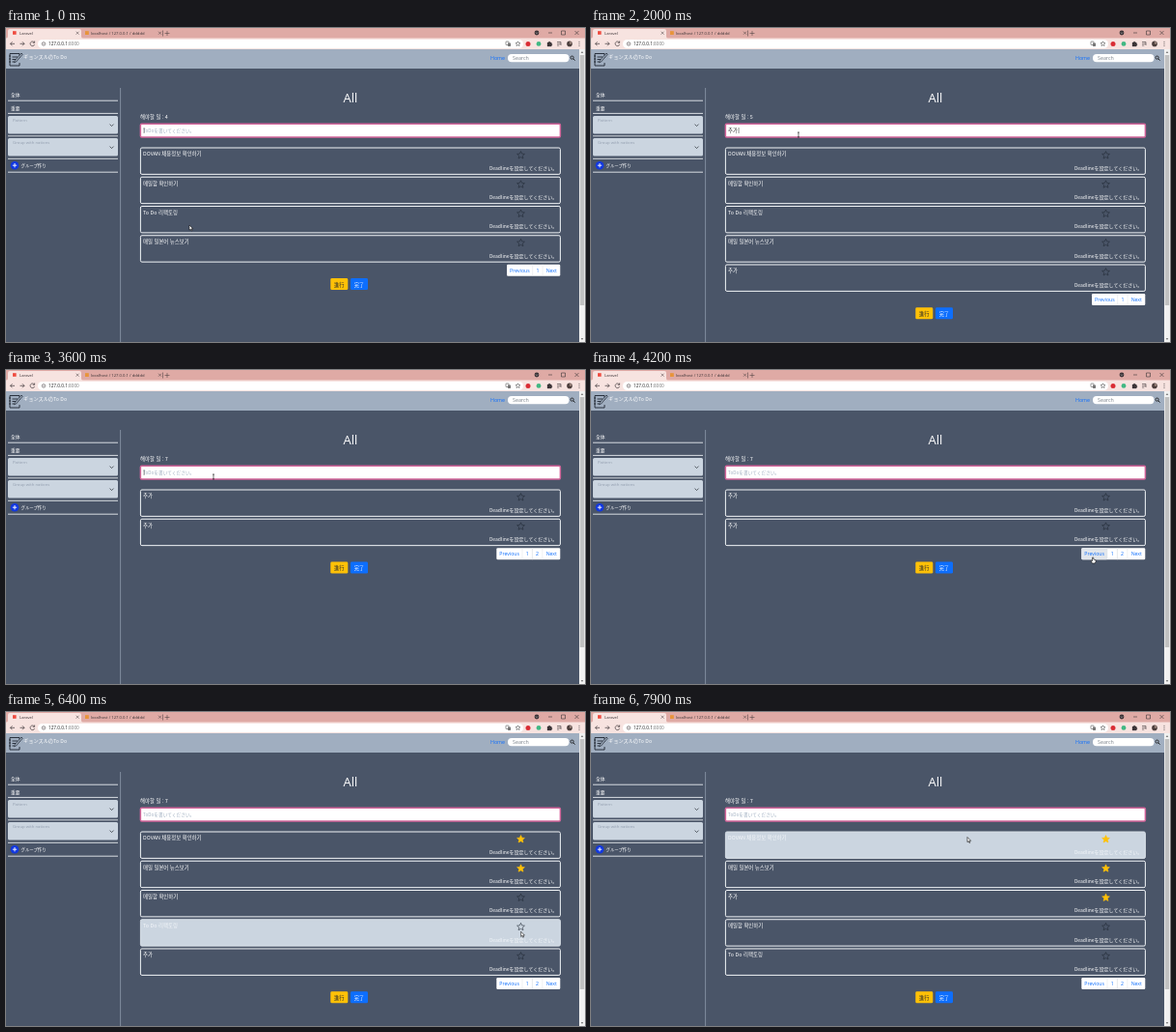
Recreate the animation shown at these times as an HTML page. Size 600 px wide and 325 px high, loop 8000 ms.

```html
<!DOCTYPE html>
<html lang="ko">
<head>
<meta charset="utf-8">
<style>
html, body { margin: 0; width: 100%; height: 100%; overflow: hidden; background: #4a5568; }
svg { display: block; width: 600px; height: 325px; }
text { font-family: "Noto Sans CJK KR", "Noto Sans CJK JP", "Noto Sans CJK", sans-serif; dominant-baseline: central; white-space: pre; }
.jp { font-family: "Noto Sans CJK JP", "Noto Sans CJK", sans-serif; }
.ui { font-family: "Open Sans", "Noto Sans", sans-serif; }
</style>
</head>
<body>
<svg viewBox="0 0 600 325"><g id="page"></g><g id="live"></g></svg>
<script>
const LOOP = 8000, ROW = 30.25, TOP = 124;
const BLUE = '#0d6efd', YELLOW = '#ffc107', PALE = '#cbd5e0', BODY = '#4a5568', INK = '#3c3437';

const rect = (x, y, w, h, fill, r = 0, more = '') =>
  `<rect x="${x}" y="${y}" width="${w}" height="${h}" rx="${r}" fill="${fill}" ${more}/>`;
const dot = (x, y, r, fill, more = '') => `<circle cx="${x}" cy="${y}" r="${r}" fill="${fill}" ${more}/>`;
const line = (d, color = INK, w = 0.7, fill = 'none') =>
  `<path d="${d}" fill="${fill}" stroke="${color}" stroke-width="${w}"/>`;
const text = (x, y, s, size, fill, cls = '', anchor = 'start') =>
  `<text x="${x}" y="${y}" font-size="${size}" fill="${fill}" class="${cls}" text-anchor="${anchor}">${s}</text>`;

function star(x, y, r, stroke, fill) {
  let d = '';
  for (let i = 0; i < 10; i++) {
    const a = i * Math.PI / 5, q = i % 2 ? r * 0.47 : r;
    d += (i ? 'L' : 'M') + (x + q * Math.sin(a)).toFixed(2) + ' ' + (y - q * Math.cos(a)).toFixed(2);
  }
  return line(d + 'Z', stroke, 0.6, fill);
}

function browser() {
  return rect(0, 0, 600, 11, '#dfaaa5') +
    line('M0 11Q2 11 2 8V3Q2 1 4 1H76Q78 1 78 3V8Q78 11 80 11Z', 'none', 0, '#f7e3e0') +
    rect(0, 10.5, 600, 11.5, '#f7e3e0') +
    rect(7, 3.2, 3.6, 3.6, '#ef4b3f') + text(14, 5.2, 'Laravel', 4.2, INK, 'ui') +
    line('M72.6 3.7l3 3m0-3l-3 3M158 3.7l3 3m0-3l-3 3M167 3v5m-2.5-2.5h5M162.5 2.5v6', INK, 0.5) +
    rect(82, 3.2, 3.8, 3.8, '#e8943a') + text(88, 5.2, 'localhost / 127.0.0.1 / ddddd', 4.2, INK, 'ui') +
    dot(550, 5, 2.4, INK) + line('M549 4.6l1 1 1-1', '#fff', 0.5) +
    line('M562 5h4M575.5 3h4v4h-4zM589.5 3l4 4m0-4l-4 4', INK, 0.6) +
    line('M9 16.3H4.5m2-2l-2 2 2 2M14.5 16.3H19m-2-2l2 2-2 2') +
    line('M29.3 15a2.3 2.3 0 1 0 .3 2M29.6 13.5v1.8h-1.8') +
    rect(33, 12, 503, 9, '#fff', 4.5) + dot(39, 16.4, 1.8, 'none', `stroke="${INK}" stroke-width=".5"`) +
    line('M39 16v1.3M39 15.2v.4', INK, 0.5) +
    text(44, 16.3, '127.0.0.1<tspan fill="#777">:8000</tspan>', 4.7, '#222', 'ui') +
    rect(518, 14, 3, 3.5, 'none', 0.4, 'stroke="#555" stroke-width=".6"') + rect(520, 15.5, 3, 3.5, '#777', 0.4) +
    star(530.5, 16.4, 2.6, '#555', 'none') + dot(541, 16.4, 2.5, '#d92d35') + dot(552, 16.4, 2.4, '#41b883') +
    line('M561 15h1.2a.9.9 0 0 1 1.8 0h1.2v1.2a.9.9 0 0 1 0 1.8v1H561z', INK, 0.3, INK) +
    line('M571 14.5h4M571 16.3h4M571 18.1h2.3M575 14.5v3.5', INK, 0.6) +
    dot(584, 16.4, 2.8, '#4b3d3b') + dot(585, 15.4, 1.2, '#a48c83') +
    [14.3, 16.3, 18.3].map(y => dot(594, y, 0.5, INK)).join('');
}

function navbar() {
  return rect(0, 22, 594, 20, '#a0aec0') +
    line('M4 26.5H14V31M14 36V39H4V26.5M3 29h2M3 32h2M3 35h2M6.5 30H12M6.5 32.5H10M6.5 35H8.5', '#1d2430', 0.9) +
    line('M16 26l1.2 1.2L10.5 35l-2 .8.6-2z', '#1d2430', 0.7, '#a0aec0') +
    text(18, 29, 'ギョンスルのTo Do', 5.2, '#fff', 'jp') +
    text(502, 31, 'Home', 5.3, BLUE, 'ui') +
    rect(520, 27, 63.5, 8.3, '#fff', 4) + text(525, 31.2, 'Search', 5.3, '#7b838b', 'ui') +
    dot(586.6, 30.6, 1.6, 'none', 'stroke="#111" stroke-width=".8"') + line('M587.8 31.8l1.8 1.8', '#111', 0.9) +
    rect(594, 22, 6, 303, '#f1f1f1') + rect(594.8, 28, 4.4, 259, '#c1c1c1') +
    line('M595.7 25.8l1.3-1.5 1.3 1.5zM595.7 321.2l1.3 1.5 1.3-1.5z', 'none', 0, '#555');
}

function sidebar() {
  const select = (y, label) => rect(2, y, 114, 18.5, PALE, 1.5) +
    text(7, y + 3.5, label, 4.3, '#929eae', 'ui') + line(`M107.5 ${y + 8.6}l2 2 2-2`, '#343a40', 0.8);
  return text(5, 68.7, '全体', 4.8, '#fff', 'jp') + text(5, 82, '重要', 4.8, '#fff', 'jp') +
    select(91, 'Pattern') + select(114, 'Group with nations') +
    [75.2, 88.4, 111.8, 135.3, 149.2].map(y => line(`M2 ${y}H116`, '#e8ecf1', 0.9)).join('') +
    dot(9, 142.2, 4.3, '#1238e0') + line('M6.8 142.2h4.4M9 140v4.4', '#fff', 0.9) +
    text(15.5, 142, 'グループ作り', 4.4, '#fff', 'jp') +
    line('M118.6 62V325', '#8f9bac', 0.8);
}

document.getElementById('page').innerHTML = rect(0, 0, 600, 325, BODY) + browser() + navbar() + sidebar() +
  text(357, 72.3, 'All', 13, '#fff', 'ui', 'middle');

const NAMES = { K: 'DOVAN 채용정보 확인하기', M: '메일함 확인하기', T: 'To Do 리팩토링', N: '매일 일본어 뉴스보기', E: '추가', F: '추가', G: '추가' };
const STARRED = { K: 5500, N: 6100, E: 7000 };
// [start, rows, open tasks, pages]
const VIEWS = [
  [0, 'KMTN', 4, 1], [650, 'KMTNE', 5, 1], [2400, 'F', 6, 2], [3600, 'FG', 7, 2],
  [4500, 'KMTNE', 7, 2], [6400, 'KNMTE', 7, 2], [7200, 'KNEMT', 7, 2]
];
const TYPING = [
  [0, ''], [150, 'ㅊ'], [250, '추'], [350, '축'], [450, '추가'], [650, ''],
  [1400, 'ㅊ'], [1500, '추'], [1600, '축'], [1700, '추가'], [1900, '추가'], [2400, ''],
  [3250, 'ㅊ'], [3300, '추'], [3400, '축'], [3500, '추가'], [3600, '']
];
const MOUSE = [
  [0, 190, 204], [900, 190, 204], [1200, 215, 110.5], [3600, 215, 110.5], [3900, 510, 208],
  [4000, 517, 199], [4200, 520, 194], [4700, 520, 194], [5200, 541, 131.5], [5500, 541, 131.5],
  [5900, 534, 223], [6300, 534, 223], [6700, 532, 250], [7350, 532, 250], [7850, 390, 129.5], [LOOP, 390, 129.5]
];

const last = (list, t) => list.filter(e => e[0] <= t).pop();

function mouseAt(t) {
  const i = Math.max(1, MOUSE.findIndex(k => k[0] > t));
  const [t0, x0, y0] = MOUSE[i - 1], [t1, x1, y1] = MOUSE[i];
  const p = (t - t0) / (t1 - t0), e = p * p * (3 - 2 * p);
  return [x0 + (x1 - x0) * e, y0 + (y1 - y0) * e];
}

function input(t) {
  const [since, value] = last(TYPING, t);
  const caret = t < 4400 && (t - since) % 1000 < 500;
  const x = 142.5 + value.length * 5;
  return rect(139.4, 99.2, 435, 13.8, '#fff', 1.2, 'stroke="#d4659b" stroke-width="1.5"') +
    (value ? text(142, 106, value, 5.4, '#333') : text(142, 106, 'ToDoを書いてください。', 4.7, '#a0aec0', 'jp')) +
    (caret ? line(`M${x + 0.6} 103v6`, '#222', 0.5) : '');
}

function card(id, i, hover, t) {
  const y = TOP + i * ROW, on = t >= STARRED[id];
  const ink = hover ? '#f4f7fa' : '#fff';
  return rect(139.4, y, 435, 27.4, hover ? PALE : BODY, 1.5, `stroke="${hover ? '#d9e0e8' : '#f1f4f7'}" stroke-width="1"`) +
    text(142, y + 6.4, NAMES[id], 5.4, ink) +
    star(533.5, y + 7.7, 4.1, on ? YELLOW : '#222a36', on ? YELLOW : 'none') +
    text(571.3, y + 20.4, 'Deadlineを設定してください。', 5, ink, 'jp', 'end');
}

function footer(n, pages, overPrevious) {
  const y = TOP + n * ROW - 0.3, x = pages > 1 ? 508.3 : 519, w = 574.3 - x;
  const cell = (cx, s) => text(cx, y + 6, s, 5.2, BLUE, 'ui', 'middle');
  let s = rect(x, y, w, 12, '#fff', 1.3) + (overPrevious ? rect(x, y, 26.7, 12, '#e2e6eb', 1.3) : '') +
    cell(x + 13.4, 'Previous') + cell(565.3, 'Next');
  for (let p = 1; p <= pages; p++) {
    const px = x + 26.7 + (p - 1) * 10.4;
    s += cell(px + 5.2, p) + line(`M${px} ${y}v12M${px + 10.4} ${y}v12`, '#dee2e6', 0.5);
  }
  return s + rect(336.3, y + 14.4, 18, 12, YELLOW, 1.4) + text(345.3, y + 20.3, '進行', 5.2, '#212529', 'jp', 'middle') +
    rect(357, y + 14.4, 18, 12, BLUE, 1.4) + text(366, y + 20.3, '完了', 5.2, '#fff', 'jp', 'middle');
}

function pointer(x, y, kind) {
  const d = {
    beam: 'M-1-2.5h2M0-2.5v5M-1 2.5h2',
    hand: 'M-.5 0Q.3-.6.7 0V2L3 2.6V4.5L2.2 6H-.5L-2 3.7-1.2 3.2-.5 3.7Z',
    arrow: 'M0 0V5.2L1.2 4.1 2 6 2.9 5.6 2.1 3.8H3.7Z'
  }[kind];
  return `<g transform="translate(${x.toFixed(2)} ${y.toFixed(2)})">${line(d, '#111', 0.6, kind === 'beam' ? 'none' : '#fff')}</g>`;
}

const live = document.getElementById('live');
function draw(now) {
  const t = now % LOOP;
  const [, rows, open, pages] = last(VIEWS, t);
  const [mx, my] = mouseAt(t);
  const offset = my - TOP, row = Math.floor(offset / ROW);
  const hover = t > 900 && offset >= 0 && offset - row * ROW < 27.4 ? row : -1;
  const overPrevious = pages > 1 && mx > 508 && mx < 535 && offset > rows.length * ROW && offset < rows.length * ROW + 12;
  const kind = my > 99 && my < 113 ? 'beam' : overPrevious ? 'hand' : 'arrow';
  live.innerHTML = text(139, 92.2, '해야할 일 : ' + open, 5.4, '#fff') + input(t) +
    [...rows].map((id, i) => card(id, i, i === hover, t)).join('') +
    footer(rows.length, pages, overPrevious) + pointer(mx, my, kind);
  requestAnimationFrame(draw);
}
draw(0);
</script>
</body>
</html>
```
